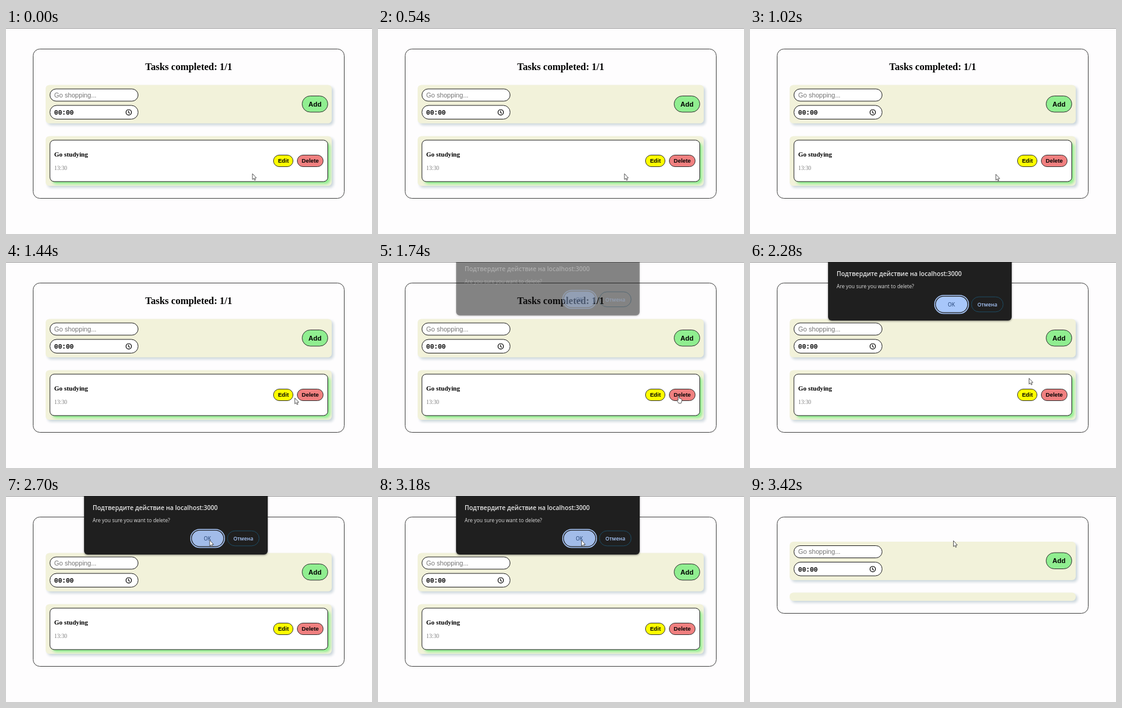
An HTML page with a canvas that plays this animation: 600 px wide and 338 px high, repeating every 3480 ms.

```html
<!DOCTYPE html>
<html lang="en">
<head>
<meta charset="utf-8">
<title>Task list</title>
<style>
html, body { margin: 0; width: 100%; height: 100%; overflow: hidden; background: #fefdfe; }
canvas { display: block; width: 600px; height: 338px; }
</style>
</head>
<body>
<canvas id="stage" width="600" height="338"></canvas>
<script>
const ctx = document.getElementById('stage').getContext('2d');
const LOOP = 3480, STEP = 60;
const OPEN = 1740, CLOSE = 3240;
const SERIF = '"Liberation Serif", serif';
const SANS = '"Liberation Sans", sans-serif';
const UI = '"Open Sans", sans-serif';

// Pointer stops: time, x, y
const path = [
  [0, 404, 239], [960, 404, 239], [1020, 403, 240], [1140, 403, 240],
  [1560, 491, 219], [1740, 490, 219], [1920, 488, 220], [2160, 488, 220],
  [2580, 334, 72.5], [3180, 333.5, 72.5], [3480, 333.5, 73.5]
];

function pill(x, y, w, h, r, fill, stroke, line = 1) {
  ctx.beginPath();
  ctx.roundRect(x, y, w, h, r);
  if (fill) { ctx.fillStyle = fill; ctx.fill(); }
  if (stroke) { ctx.strokeStyle = stroke; ctx.lineWidth = line; ctx.stroke(); }
}

function withShadow(color, dx, dy, blur, draw) {
  ctx.save();
  ctx.shadowColor = color;
  ctx.shadowOffsetX = dx;
  ctx.shadowOffsetY = dy;
  ctx.shadowBlur = blur;
  draw();
  ctx.restore();
}

function text(str, x, y, font, color = '#000', align = 'left') {
  ctx.font = font;
  ctx.fillStyle = color;
  ctx.textAlign = align;
  ctx.fillText(str, x, y);
}

function polyline(points, close) {
  ctx.beginPath();
  points.forEach(([x, y]) => ctx.lineTo(x, y));
  if (close) ctx.closePath();
}

function panel(y, h) {
  withShadow('#cbd6dc', 3, 3, 4, () => pill(65, y, 469, h, Math.min(6, h / 2), '#f2f2da'));
}

function form() {
  panel(93.5, 63);
  pill(72, 100, 144.5, 20, 10, '#fff', '#222');
  text('Go shopping...', 79, 113.5, '10.67px ' + SANS, '#757575');
  pill(72, 127, 144.5, 22.5, 11, '#fff', '#222');
  text('00:00', 79, 142, '10.67px "Liberation Mono", monospace');
  ctx.strokeStyle = '#000';
  ctx.lineWidth = 0.35;
  ctx.strokeText('00:00', 79, 142);

  ctx.lineWidth = 1.2;
  ctx.beginPath();
  ctx.arc(201.2, 138.4, 4.4, 0, Math.PI * 2);
  ctx.stroke();
  polyline([[201, 135.8], [201, 138.8], [203, 140.2]]);
  ctx.stroke();

  pill(485.5, 111.5, 42, 26.5, 13.2, '#90ee90', '#333');
  text('Add', 506.5, 128.5, 'bold 11px ' + SANS, '#000', 'center');
}

function task() {
  withShadow('#90ee90', 4, 4, 4, () => pill(72, 184, 455.5, 68, 7, '#fff'));
  pill(72, 184, 455.5, 68, 7, '#fff', '#222');
  text('Go studying', 79, 211, 'bold 10.67px ' + SERIF);
  text('13:30', 79, 233, '9.33px ' + SERIF, '#808080');
  pill(438.5, 208.5, 32, 19, 9.5, '#ff0', '#333');
  text('Edit', 454.7, 220.8, 'bold 9.33px ' + SANS, '#000', 'center');
  pill(477.5, 208.5, 42.5, 19, 9.5, '#f08080', '#333');
  text('Delete', 498.8, 220.8, 'bold 9.33px ' + SANS, '#000', 'center');
}

function page(deleted) {
  ctx.fillStyle = '#fefdfe';
  ctx.fillRect(0, 0, 600, 338);
  ctx.fillStyle = '#999';
  ctx.fillRect(0, 0, 600, 1);
  pill(44.5, 34.5, 510, deleted ? 158 : 245, 11, null, '#444');

  ctx.save();
  if (deleted) ctx.translate(0, -18.5);
  else text('Tasks completed: 1/1', 299.5, 69, 'bold 16px ' + SERIF, '#000', 'center');
  form();
  ctx.restore();

  if (deleted) panel(158.5, 13.5);
  else {
    panel(177.5, 81.5);
    task();
  }
}

function dialog(alpha, lift, hover) {
  if (!alpha) return;
  ctx.save();
  ctx.globalAlpha = alpha;
  ctx.translate(0, -lift);
  withShadow('rgba(0,0,0,.5)', 0, 1, 3, () => pill(128, -20, 301, 116, 6, '#1f1f1f'));
  text('Подтвердите действие на localhost:3000', 142, 23.3, '600 10.1px ' + UI, '#e8e8e8');
  text('Are you sure you want to delete?', 142, 43, '8.35px ' + UI, '#dedede');
  pill(302.7, 54.7, 55.6, 29.8, 14.9, null, '#a8c7fa', 1.5);
  pill(304.7, 56.7, 51.6, 25.8, 12.9, hover ? '#a2bce9' : '#a8c7fa');
  text('OK', 330, 73, '8.35px ' + UI, '#19396b', 'center');
  pill(363, 57.2, 52, 24.6, 12.3, null, '#1d4a61');
  text('Отмена', 389, 73, '600 8.4px ' + UI, '#a8c7fa', 'center');
  ctx.restore();
}

function pointerAt(t) {
  const i = path.findIndex(stop => stop[0] > t);
  const [t0, x0, y0] = path[i - 1], [t1, x1, y1] = path[i];
  const p = (t - t0) / (t1 - t0), k = p * p * (3 - 2 * p);
  return [x0 + (x1 - x0) * k, y0 + (y1 - y0) * k];
}

function pointer(x, y) {
  const hand = x > 477 && x < 521 && y > 208 && y < 228;
  ctx.save();
  ctx.translate(x, y);
  if (hand) {
    polyline([[2, 0.5], [3.5, 0.5], [3.8, 4.5], [7.5, 5.8], [8.3, 7], [7.8, 10],
      [6.8, 12.8], [3, 12.8], [0.2, 8.5], [0.4, 7.3], [2, 8.2]], true);
  } else {
    polyline([[0, 0], [0, 9.6], [2.1, 7.7], [3.5, 10.8], [5, 10.2], [3.7, 7.2], [6.4, 7]], true);
  }
  ctx.fillStyle = '#fff';
  ctx.strokeStyle = '#333';
  ctx.lineWidth = 0.8;
  ctx.lineJoin = 'round';
  ctx.fill();
  ctx.stroke();
  ctx.restore();
}

function draw(time) {
  const t = Math.floor((time % LOOP) / STEP) * STEP;
  const [x, y] = pointerAt(t);
  const shown = t < OPEN ? 0
    : t < CLOSE ? Math.min(1, 0.41 + (t - OPEN) / 130)
    : t < CLOSE + STEP ? 0.4 : 0;
  page(t >= CLOSE);
  dialog(shown, (1 - shown) * 14, x < 358 && y < 85);
  pointer(x, y);
}

const start = performance.now();
function tick() {
  draw(performance.now() - start);
  requestAnimationFrame(tick);
}
tick();
</script>
</body>
</html>
```
